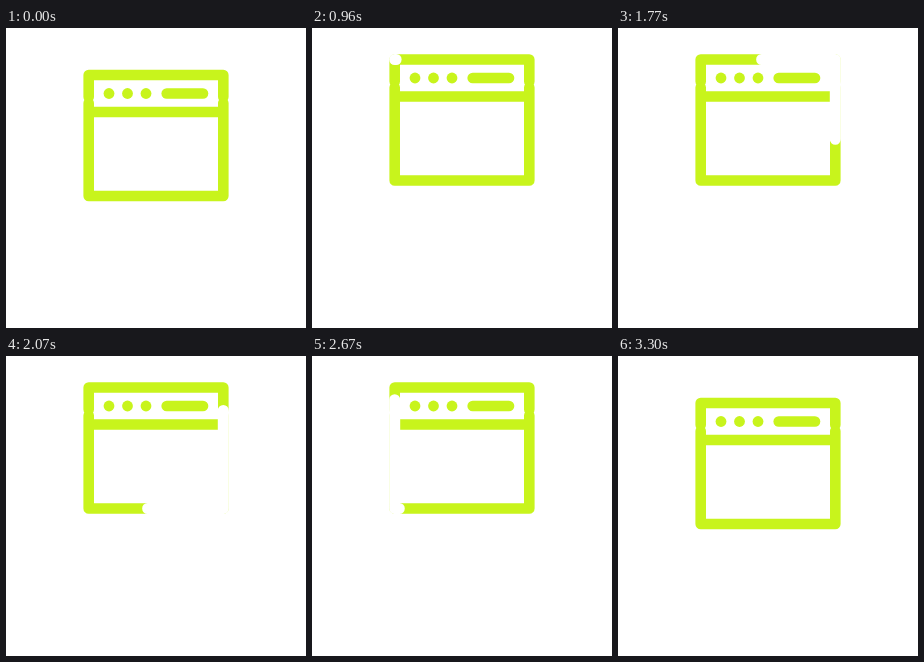
Recreate the animation shown at these times as an HTML page. Size 300 by 300 pixels, loop 3600 ms.

```html
<!DOCTYPE html>
<html lang="en">
<head>
<meta charset="utf-8">
<title>Browser window</title>
<style>
  html, body { margin: 0; width: 100%; height: 100%; overflow: hidden; background: #fff; }
  svg { display: block; width: 100vw; height: 100vh; }
  path { fill: none; stroke-width: 10.6; stroke-linecap: round; stroke-linejoin: round; }
  .line { stroke: #c8f41c; }
  .sweep { stroke: #fff; stroke-width: 11; }
  circle { fill: #c8f41c; }
</style>
</head>
<body>
<svg viewBox="0 0 300 300">
  <g id="win">
    <path class="line" d="M82.7 69V47H217.3V69"/>
    <path class="line" d="M82.7 75V168H217.3V75M82.7 84H217.3"/>
    <circle cx="103" cy="65.5" r="5.4"/>
    <circle cx="121.5" cy="65.5" r="5.4"/>
    <circle cx="140" cy="65.5" r="5.4"/>
    <path class="line" d="M160.7 65.5H197"/>
    <path class="sweep" id="sweep" pathLength="1" d="M82.7 47H217.3V168H82.7V47"/>
  </g>
</svg>
<script>
  const LOOP = 3600, STEP = 30, LIFT = 15.5;
  const win = document.getElementById('win');
  const sweep = document.getElementById('sweep');

  // Eased progress from 0 to 1 between two times
  function ease(t, from, to) {
    const u = Math.min(1, Math.max(0, (t - from) / (to - from)));
    return u * u * (3 - 2 * u);
  }

  function draw(now) {
    const t = Math.floor((now % LOOP) / STEP) * STEP;
    const lift = LIFT * (ease(t, 300, 900) - ease(t, 3000, 3300));
    win.setAttribute('transform', `translate(0 ${-lift})`);

    const head = ease(t, 900, 2850);
    const tail = ease(t, 1350, 3300);
    const length = head - tail;
    sweep.style.visibility = length > 0 ? 'visible' : 'hidden';
    sweep.style.strokeDasharray = `${length} 2`;
    sweep.style.strokeDashoffset = -tail;
  }

  const start = performance.now();
  function tick() {
    draw(performance.now() - start);
    requestAnimationFrame(tick);
  }
  tick();
</script>
</body>
</html>
```
